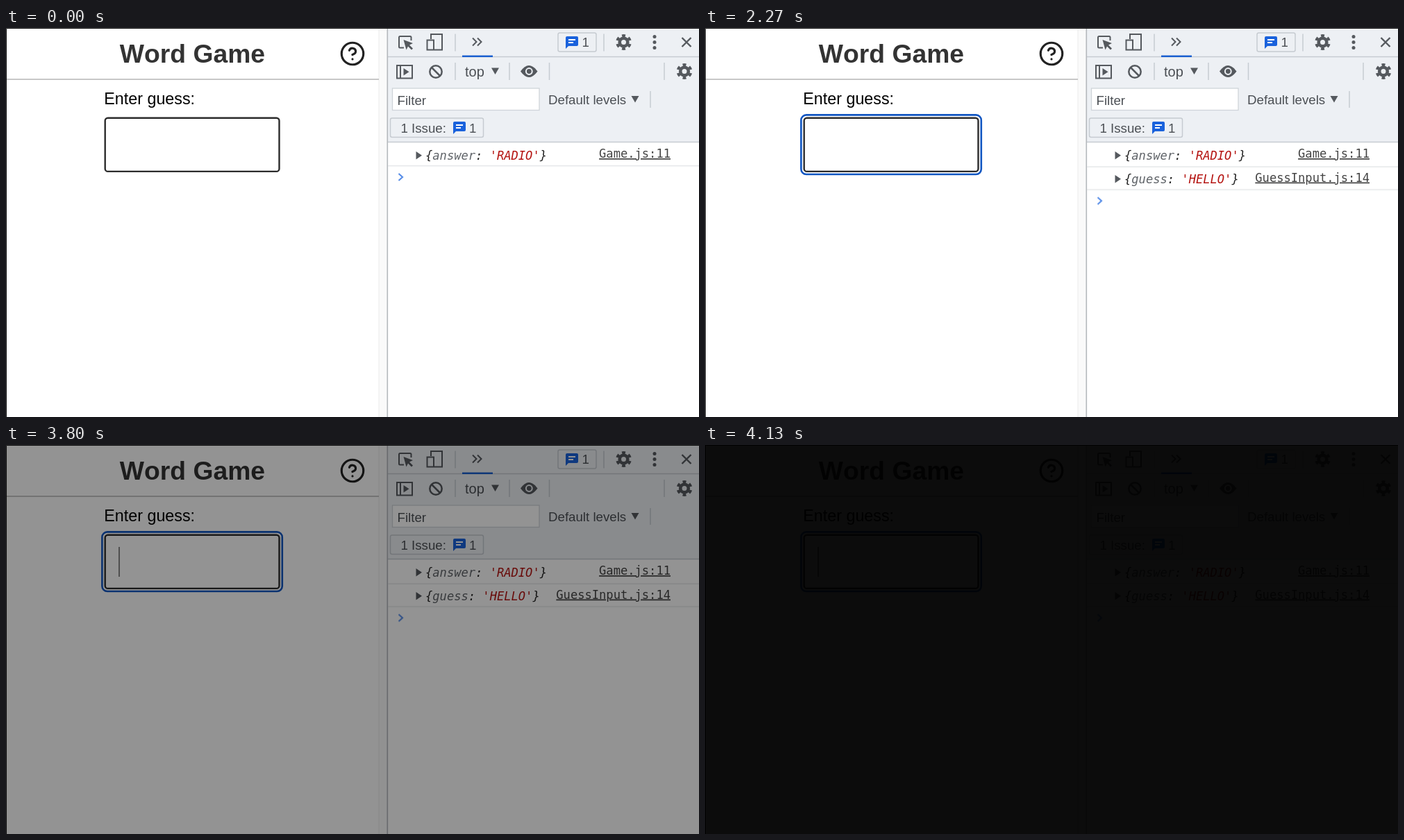
Write an HTML page that moves like this. It is 998x561 px and loops after 4.2 s.

```html
<!DOCTYPE html>
<html lang="en">
<head>
<meta charset="utf-8">
<title>Word Game</title>
<style>
  html, body { margin: 0; width: 100%; height: 100%; overflow: hidden; background: #fff; }
  svg { position: absolute; left: 0; top: 0; }
  text { font: 18.7px "Liberation Sans", Arial, sans-serif; white-space: pre; fill: #4b4f54; }
  .title { font-size: 37.3px; font-weight: 700; font-kerning: none; fill: #333; }
  .label { font-size: 23.3px; fill: #000; }
  .code { font: 17.1px "DejaVu Sans Mono", monospace; fill: #222; }
  .object { font-style: italic; }
  .key { fill: #5f6368; }
  .string { fill: #b4120f; }
  .link { fill: #444; text-decoration: underline; }

  .line { fill: none; stroke: #55595e; stroke-width: 2; }
  .solid { fill: #55595e; }
  .rule { fill: none; stroke: #c6cbd1; stroke-width: 1.5; }
  .row-rule { stroke: #e6e8ea; stroke-width: 1.5; }

  .ring, .arrow, .beam, .typed, .typed::after, .logged, .tail, .fade {
    animation: 4.2s step-end infinite;
  }
  .ring { animation-name: focus; }
  .arrow { animation-name: approach; }
  .beam { animation-name: hover; }
  .logged { animation-name: log; }
  .tail { animation-name: push; }

  .typed {
    position: absolute; left: 162px; top: 147px; width: 0; height: 43px;
    font: 37.3px/43px "Liberation Sans", Arial, sans-serif;
    font-kerning: none; color: #000; animation-name: type;
  }
  .typed span { display: block; overflow: hidden; }
  .typed::after {
    content: ""; position: absolute; left: 100%; top: 0;
    width: 2px; height: 43px; background: #888; animation-name: blink;
  }
  .fade {
    position: absolute; inset: 0; background: #000;
    animation-name: darken;
  }

  @keyframes focus { 0% { opacity: 0 } 11.19%, 100% { opacity: 1 } }
  @keyframes approach {
    0% { opacity: 0; transform: translate(20px, 190px) }
    3.09% { opacity: 1; transform: translate(20px, 190px) }
    4.76% { opacity: 1; transform: translate(58px, 177px) }
    6.42% { opacity: 1; transform: translate(110px, 164px) }
    7.85%, 100% { opacity: 0; transform: translate(110px, 164px) }
  }
  @keyframes hover {
    0% { opacity: 0; transform: translate(150px, 156px) }
    7.85% { opacity: 1; transform: translate(150px, 156px) }
    9.52% { opacity: 1; transform: translate(174px, 152px) }
    26.9%, 100% { opacity: 0; transform: translate(174px, 152px) }
  }
  @keyframes type {
    0% { width: 0 }
    26.9% { width: .722em }
    30.23% { width: 1.389em }
    35% { width: 1.945em }
    38.09% { width: 2.501em }
    42.85% { width: 3.279em }
    47.61%, 100% { width: 0 }
  }
  @keyframes blink {
    0%, 23.8%, 54.04%, 77.85% { opacity: 0 }
    11.19%, 26.9%, 66.66%, 90.47%, 100% { opacity: 1 }
  }
  @keyframes log { 0% { opacity: 0 } 49.28%, 100% { opacity: 1 } }
  @keyframes push { 0% { transform: none } 49.28%, 100% { transform: translateY(34.3px) } }
  @keyframes darken {
    0% { opacity: 0 }
    85.65% { opacity: 0; animation-timing-function: steps(9, start) }
    99.8%, 100% { opacity: .952 }
  }
</style>
</head>
<body>
<svg width="998" height="561" viewBox="0 0 998 561">
  <defs>
    <g id="gear">
      <circle r="5.8" class="line" style="stroke-width:4.6"/>
      <circle r="9.4" class="line" pathLength="12" stroke-dasharray="1 1" stroke-dashoffset="-.5" style="stroke-width:4"/>
    </g>
    <g id="chat">
      <path d="M2 0h14q2 0 2 2v10q0 2-2 2H4l-4 4V2q0-2 2-2z" fill="#1a62dc"/>
      <path d="M4 5h10M4 9h7" stroke="#fff" stroke-width="1.8"/>
    </g>
    <path id="down" d="M0 0h11l-5.5 9.5z" class="solid"/>
    <path id="expand" d="M590.5 178v11.5l8.5-5.75z" class="solid"/>
  </defs>

  <!-- Page -->
  <path d="M537 1h12v560h-12z" fill="#fafafa"/>
  <path d="M537 1v560" stroke="#ebebeb"/>
  <path d="M1 74h536" stroke="#b5b5b5" stroke-width="1.6"/>
  <text class="title" x="163.8" y="50">Word Game</text>
  <g transform="translate(480.1 18.1) scale(1.575)" fill="none" stroke="#222" stroke-width="2" stroke-linecap="round" stroke-linejoin="round">
    <circle cx="12" cy="12" r="10"/>
    <path d="M9.09 9a3 3 0 0 1 5.83 1c0 2-3 3-3 3M12 17h.01"/>
  </g>
  <text class="label" x="141.3" y="109.7">Enter guess:</text>
  <rect x="142.7" y="129.7" width="250.8" height="77.2" rx="4" fill="#fff" stroke="#2c2c2c" stroke-width="2.4"/>
  <rect class="ring" x="138.4" y="125.4" width="259.4" height="85.6" rx="7.5" fill="none" stroke="#1156c2" stroke-width="2.6"/>

  <!-- Developer tools -->
  <path d="M549 1h449v163H549z" fill="#edf0f4"/>
  <path class="rule" d="M549 41.5h449M549 164.5h449"/>
  <path d="M549.3 1v560" stroke="#b4b8bc" stroke-width="1.6"/>
  <path class="rule" d="M647 8.5v25M861 8.5v25M647 50v25M725 50v25M782.5 50v25M948 50v25M928 91v24"/>
  <path d="M657 40.7h44" stroke="#1a5fd0" stroke-width="2.6"/>

  <path class="line" d="M573 28.5h-5.5q-1.5 0-1.5-1.5V13.5q0-1.5 1.5-1.5H582q1.5 0 1.5 1.5V18"/>
  <path class="solid" d="M572.5 17l13.5 5-5 2.5 5 5-2 2-5-5-2.5 5z"/>
  <path class="line" d="M612 16V9h16v22.5h-11M606.5 17.5h9.5v14h-9.5z"/>
  <path class="line" d="M672 14.5l5.5 5.5-5.5 5.5M679 14.5l5.5 5.5-5.5 5.5"/>
  <rect class="rule" x="795" y="7" width="55" height="27" rx="2.5"/>
  <use href="#chat" x="806" y="12"/>
  <text x="829.5" y="27">1</text>
  <use href="#gear" x="889.5" y="20.5"/>
  <g class="solid"><circle cx="934" cy="12.5" r="2.5"/><circle cx="934" cy="20.5" r="2.5"/><circle cx="934" cy="28.5" r="2.5"/></g>
  <path class="line" d="M973.5 14l13 13m0-13l-13 13" style="stroke-width:2.4"/>

  <path class="line" d="M563 54h22v18.5h-22zM568 54v18.5"/>
  <path class="solid" d="M572.5 58v10.5l8-5.25z"/>
  <circle class="line" cx="619" cy="63" r="8.7" style="stroke-width:2.5"/>
  <path class="line" d="M613 57l12 12" style="stroke-width:2.5"/>
  <text x="661" y="69.5" style="font-size:20px">top</text>
  <use href="#down" x="699" y="57.5"/>
  <path class="solid" d="M741 62.5q12-17 24.5 0q-12.5 17-24.5 0z"/>
  <circle cx="753.3" cy="62.5" r="4.4" fill="#55595e" stroke="#edf0f4" stroke-width="2"/>
  <use href="#gear" x="977" y="62.5"/>

  <rect x="556.5" y="87" width="211.5" height="31.5" fill="#fff" stroke="#cfd4d9" stroke-width="1.3"/>
  <text x="563.5" y="110.7">Filter</text>
  <text x="781" y="110">Default levels</text>
  <use href="#down" x="900.5" y="98"/>

  <rect class="rule" x="553.5" y="130" width="134" height="27.5" rx="2.5"/>
  <text x="568.5" y="150.5">1 Issue:</text>
  <use href="#chat" x="644" y="135"/>
  <text x="667" y="150.5">1</text>

  <!-- Console -->
  <use href="#expand"/>
  <text class="code object" x="604" y="189.5">{<tspan class="key">answer</tspan>: <tspan class="string">'RADIO'</tspan>}</text>
  <text class="code link" x="957" y="187" text-anchor="end">Game.js:11</text>
  <g class="logged">
    <path class="row-rule" d="M550 200.2h448"/>
    <use href="#expand" y="34"/>
    <text class="code object" x="604" y="223.7">{<tspan class="key">guess</tspan>: <tspan class="string">'HELLO'</tspan>}</text>
    <text class="code link" x="957" y="221.5" text-anchor="end">GuessInput.js:14</text>
  </g>
  <g class="tail">
    <path class="row-rule" d="M550 198.7h448"/>
    <path d="M565.5 210l5.5 5-5.5 5" fill="none" stroke="#5a8fe8" stroke-width="2.2"/>
  </g>
</svg>

<div class="typed"><span>HELLO</span></div>

<svg width="998" height="561" viewBox="0 0 998 561">
  <path class="arrow" d="M0 0v16l3.7-3.4 2.4 5.6 2.7-1.2-2.4-5.4h5z" fill="#000" stroke="#fff"/>
  <path class="beam" d="M-3.2-5.5q2.7 0 3.2 1.5q.5-1.5 3.2-1.5M0-4V4.5M-3.2 6q2.7 0 3.2-1.5q.5 1.5 3.2 1.5M-1.8 1.5h3.6" fill="none" stroke="#333" stroke-width="1.2"/>
  <path d="M.5 561V.5H998" fill="none" stroke="#111"/>
</svg>
<div class="fade"></div>
</body>
</html>
```
